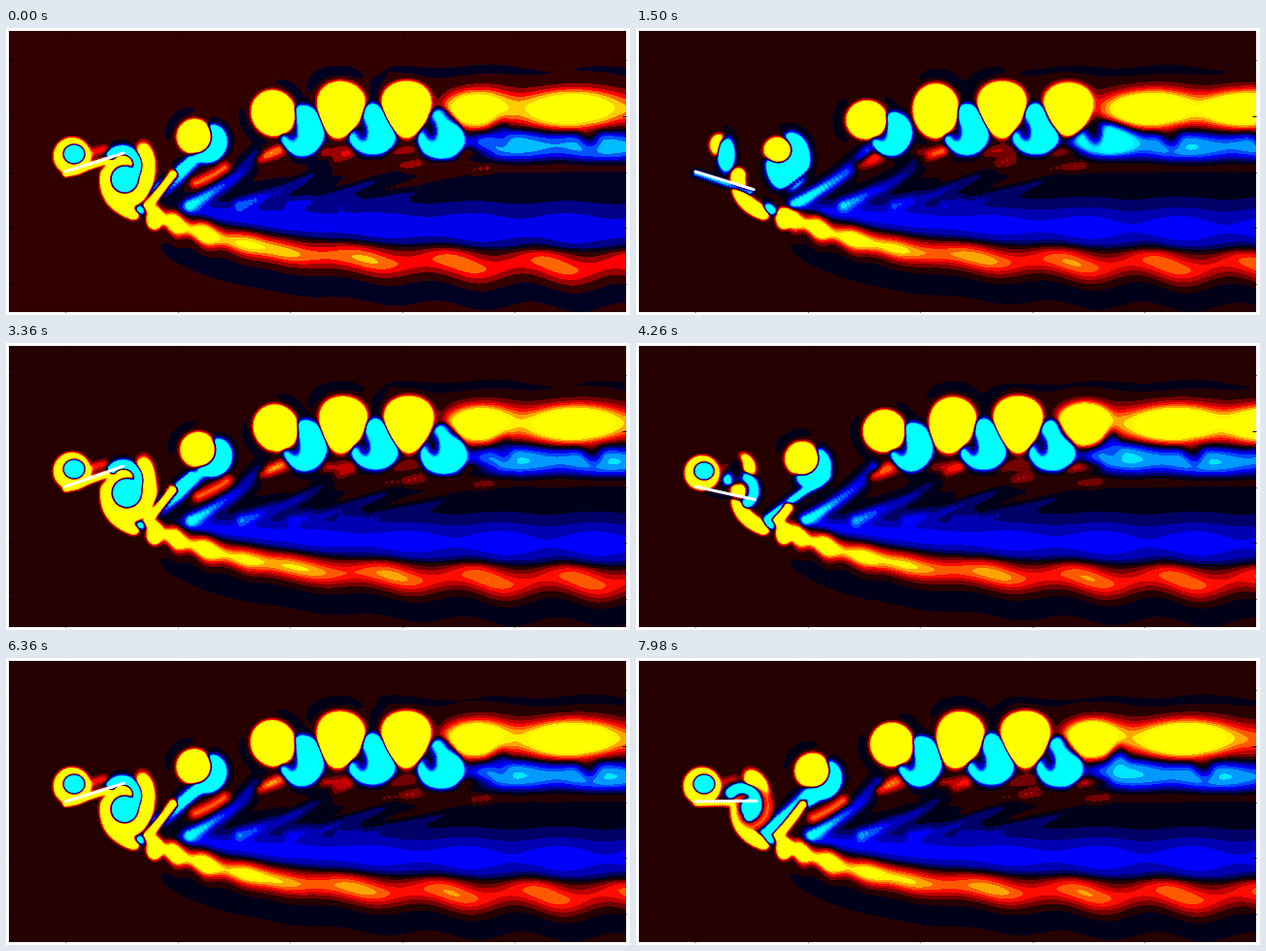
These frames come from a looping animation (642x296 px, 8000 ms). A matplotlib script:

```python
import math
import numpy as np
import matplotlib.pyplot as plt
from matplotlib.animation import FuncAnimation

W, H, DPI = 642, 296, 100
LEFT, TOP, RIGHT, BOTTOM = 3, 3, 638, 293
STEP_MS, TICK_MS, LOOP_MS = 60, 20, 8000
RATE = 0.1792            # flapping periods per step
PX = 72 / DPI

xs = np.arange(LEFT, RIGHT, dtype=np.float32) + 0.5
ys = np.arange(TOP, BOTTOM, dtype=np.float32)[:, None] + 0.5


def smooth(t):
    t = min(max(t, 0), 1)
    return t * t * (3 - 2 * t)


def bump(u, centre, width):
    return math.exp(-((u - centre) / width) ** 2)


def window(x0, x1, y0, y1):
    x0, x1 = max(0, int(x0 - LEFT)), min(RIGHT - LEFT, int(x1 - LEFT))
    y0, y1 = max(0, int(y0 - TOP)), min(BOTTOM - TOP, int(y1 - TOP))
    return (slice(y0, y1), slice(x0, x1)) if x1 > x0 and y1 > y0 else None


def cover(w, win, d, peak, soft):
    """Blend a flat value over the field; d is the distance outside its edge."""
    m = 1 / (1 + np.exp(np.clip(2 * d / soft, -30, 30)))
    w[win] += (peak - w[win]) * m


def patch(w, x, y, a, b, peak, tilt=0, taper=0, soft=3.0, halo=0.0):
    reach = max(a, b) * (1 + max(4 * soft, 18 if halo else 0) / min(a, b))
    win = window(x - reach, x + reach, y - reach, y + reach)
    if win is None:
        return
    c, s = math.cos(math.radians(tilt)), math.sin(math.radians(tilt))
    dx, dy = xs[win[1]] - x, ys[win[0]] - y
    e, f = dx * c + dy * s, dy * c - dx * s
    e = e / (1 - taper * np.clip(f / b, -1.3, 1.3))
    d = (np.hypot(e / a, f / b) - 1) * min(a, b)
    if halo:
        broken = np.clip(0.3 + np.sin(2 * np.arctan2(dy, dx) + x / 30), 0, 1)
        w[win] -= halo * broken * np.exp(-((d - 9) / 4) ** 2)
    cover(w, win, d, peak, soft)


def bend(p0, p1, p2, n=22):
    t = np.linspace(0, 1, n)[:, None]
    p0, p1, p2 = map(np.array, (p0, p1, p2))
    return (1 - t) ** 2 * p0 + 2 * t * (1 - t) * p1 + t ** 2 * p2


def nearest(pts, reach):
    """Window around a curve, distance to it and the position along it."""
    (x0, y0), (x1, y1) = pts.min(0) - reach, pts.max(0) + reach
    win = window(x0, x1, y0, y1)
    if win is None:
        return None, None, None
    X, Y = xs[win[1]], ys[win[0]]
    best = np.full((Y.shape[0], X.shape[0]), 1e6, np.float32)
    pos = np.zeros_like(best)
    for i, (x, y) in enumerate(pts):
        q = (X - x) ** 2 + (Y - y) ** 2
        closer = q < best
        best[closer] = q[closer]
        pos[closer] = i / (len(pts) - 1)
    return win, np.sqrt(best), pos


def stroke(w, pts, radius, peak, soft=2.5):
    win, d, _ = nearest(pts, radius + 4 * soft)
    if win is not None:
        cover(w, win, d - radius, peak, soft)


def wisp(w, pts, sigma, peak, tip=1.0):
    """Faint streak whose strength runs from peak to peak * tip."""
    win, d, pos = nearest(pts, 2.6 * sigma)
    if win is not None:
        w[win] += peak * (1 + (tip - 1) * pos) * np.exp(-(d / sigma) ** 2)


def band(w, centre, sigma, amp, x0, y0, y1):
    win = slice(y0 - TOP, y1 - TOP), slice(x0 - LEFT, None)
    pick = lambda q: q[win[1]] if np.ndim(q) else q
    w[win] += pick(amp) * np.exp(-((ys[win[0]] - pick(centre)) / pick(sigma)) ** 2)


def ramp(lo, hi):
    return np.clip((xs - lo) / (hi - lo), 0, 1)


def decay(start, length):
    return np.exp(-np.maximum(xs - start, 0) / length)


LOW_Y = 246 - 60 * decay(140, 110)
LOW_S = 15 - 7 * decay(140, 200)
LOW_A = (1.15 + 2.6 * decay(145, 95)) * ramp(138, 150)
CORE_TOP = 150 + 26 * decay(165, 110)
CORE_LOW = 231 - 45 * decay(165, 120)
Q = (ys - CORE_TOP) / (CORE_LOW - CORE_TOP)
CORE = (-(0.12 + 0.93 * np.exp(-((Q - 0.72) / 0.33) ** 2)) * ramp(160, 190)
        / (1 + np.exp(np.clip((CORE_TOP - ys) / 2, -30, 30)))
        / (1 + np.exp(np.clip((ys - CORE_LOW) / 2, -30, 30)))).astype(np.float32)


def layers(w, k, phase):
    wave = 2 * np.pi * (xs - 80 - 10.9 * k) / 97
    far = ramp(230, 500)
    near = 1 - ramp(200, 290)
    beads = near * np.cos(2 * np.pi * (9 * np.log(np.maximum(xs - 100, 30) / 52) / 3.2 - phase))
    low_y = LOW_Y + 5 * far * np.sin(wave)
    w += CORE * (1 + 0.1 * far * np.sin(wave + 0.8))
    band(w, low_y, LOW_S * (1 + 0.1 * far * np.cos(wave) + 0.15 * beads),
         LOW_A * (1 + 0.22 * ramp(200, 380) * np.cos(wave) + 0.25 * beads), 135, 165, BOTTOM)
    band(w, low_y + 30, 9, -0.16 * ramp(150, 220), 150, 200, BOTTOM)
    swell = 2 * np.pi * (xs / 105 - phase)
    band(w, 82 + 2 * np.sin(swell), 16, 1.35 * ramp(450, 500), 450, 30, 140)
    band(w, 121 + 2 * np.sin(swell + 1), 12, -1.35 * ramp(460, 510), 460, 75, 165)
    band(w, 142, 5, 0.2 * ramp(330, 380), 320, 120, 165)
    band(w, 45 + 2 * np.sin(swell), 4.5,
         -0.1 * ramp(375, 410) * (0.75 + 0.4 * np.sin(swell / 2)), 375, 25, 70)


BIRTH = (0.2, 0.41, 0.81, 1.0, 1.41, 1.81, 2.0)


def warm_at(u):
    if u < 2:
        return (np.interp(u, BIRTH, (74, 79, 121, 143, 139, 180, 194)),
                np.interp(u, BIRTH, (117, 119, 129, 138, 128, 117, 112)))
    v = u - 2
    x = 194 + 68 * v + 14 * (1 - math.exp(-3 * v)) + 30 * max(u - 5.9, 0)
    return x, 84 + 28 * math.exp(-2 * v)


def cold_at(u):
    if u < 2:
        return (np.interp(u, BIRTH[2:], (117, 122, 149, 191, 209)),
                np.interp(u, BIRTH[2:], (154, 156, 140, 126, 119)))
    v = u - 2
    x = 209 + 71 * v + 26 * (1 - math.exp(-3 * v)) + 25 * max(u - 6.2, 0)
    return x, 104 + 15 * math.exp(-2 * v) + 11 * min(max(u - 4.6, 0), 1.6)


def warm(w, u):
    x, y = warm_at(u)
    far = smooth((u - 5.3) / 0.7)
    if u < 1.3:
        grow = smooth((u - 0.1) / 0.4)
        patch(w, x, y, 3 + 6 * grow, 3 + 7 * grow + 7 * smooth((u - 0.6) / 0.4), 5,
              -35 * bump(u, 0.81, 0.15))
        return
    fresh = math.exp(-1.2 * max(u - 2, 0))
    a = 23.5 - 6.5 * fresh + 20 * min(max(u - 5.6, 0), 1)
    b = 17 + 11 * smooth((u - 2) / 1.9) - 10 * far
    if u < 1.8:
        a, b = 13 + 4 * smooth((u - 1.4) / 0.4), 12 + 5 * smooth((u - 1.4) / 0.4)
    patch(w, x, y, a, b, 5 - 2.2 * far, -35 * bump(u, 2.9, 0.35) + 15 * bump(u, 3.8, 0.25),
          0.27 * smooth(u - 3.2) * (1 - far), 3 + 5 * far,
          0.14 if 1.7 < u < 5.4 else 0)


def cold(w, u):
    x, y = cold_at(u)
    far = smooth((u - 5) / 0.8)
    if u < 1.3:
        ring = smooth((u - 0.75) / 0.25) * (1 - smooth((u - 1.2) / 0.1))
        size = 8 + 9 * smooth((u - 0.75) / 0.4)
        if ring:
            patch(w, x + 3, y + 1, size + 11, size + 15, 5 * ring, 12)
        patch(w, x, y, size, size, -5)
        return
    big = bump(u, 1.41, 0.2)
    a = 17 + 5 * smooth(u - 2) + 5 * big + 16 * far
    b = 19 + 6 * smooth(u - 2) + 11 * big - 13 * far
    patch(w, x, y, a, b, -5 + 3.1 * far, 30 * bump(u, 2.2, 0.6),
          -0.28 * smooth(u - 3) * (1 - far), 3 + 4 * far)
    patch(w, x - 12, 104, 9, 16, -2 * bump(u, 5.85, 0.2), -15, 0, 5)


def trail(w, u):
    """Blue arm left behind a vortex, with a red crease above it."""
    v = u - 2
    x, _ = cold_at(u)
    foot = np.array((137 + 52 * v, 182))
    head = np.array((x - 6 - 40 * smooth(v), 124 + 7 * max(v, 0)))
    knee = 0.45 * foot + 0.55 * head + (6, 7)
    wisp(w, bend(foot, knee, head), 6.5, -3.6 * math.exp(-0.62 * v), 0.6)
    if v > 0.3:
        up = np.array((4, -15))
        wisp(w, bend(foot + (25, -8), knee + up, head + up + (18, 8)), 5,
             0.25, 4 * math.exp(-0.25 * v))
    wx, wy = warm_at(u)
    wx += 17 * math.exp(-2 * max(v, 0))
    rise = 10 * math.exp(-v / 2)
    wisp(w, bend((wx - 16, wy + 42 + rise * 0.6), (wx, wy + 42), (wx + 14, wy + 42 - rise)),
         6.5, 1.3 * math.exp(-0.3 * v) + bump(u, 5.85, 0.3))


def nose(w, u):
    """Vortex on the leading edge, ringed by the opposite sign."""
    grow, leave = smooth((u - 0.45) / 0.35), smooth((u - 1.12) / 0.3)
    x, y = 70 + 20 * leave + 45 * max(u - 1.42, 0), 146 - 16 * grow
    fade = 1 - smooth((u - 1.5) / 0.25)
    a, b = 3 + 8 * grow - 3 * leave, 2 + 8 * grow + 6 * leave
    ring = grow * (1 - leave)
    if ring > 0.05:
        patch(w, x - 2, y + 2, a + 7, b + 8, 5 * ring, soft=2.5)
    patch(w, x, y, a, b, -5 * fade, soft=2.5)


def hook(w, u):
    """Cold sheet rolling over the plate's tip into the main vortex."""
    s = smooth((u - 0.75) / 0.3)
    strength = smooth((u - 0.62) / 0.15) * (1 - smooth((u - 1.1) / 0.12))
    if strength > 0.02:
        cx, cy, r = 106 + 15 * s, 152 - 11 * s, 15.5
        ang = np.radians(np.linspace(-135, 60, 22))
        pts = np.column_stack((cx + r * np.cos(ang), cy + r * np.sin(ang)))
        stroke(w, pts, 4.5, -5 * strength)


def plate_tip(phase):
    dy = 0.5 - 22 * math.cos(2 * math.pi * (phase - 0.075))
    return 60 + math.sqrt(64 ** 2 - dy ** 2), 148 + dy


def roots(w, phase):
    """Sheets leaving the plate and the lower corner of the wake."""
    stroke(w, bend((105, 152), (103, 180), (131, 190)), 6.5, 5)
    u = phase + 1 if phase > 0.6 else phase + 2
    along = smooth((u - 1.6) / 0.25) * (1 - 0.65 * smooth((u - 2.02) / 0.15))
    if u < 2.5:
        tip = np.array((141 + 31 * along, 187 - 36 * along))
        stroke(w, bend((135, 182), (152, 167), (190 + 8 * phase, 137)), 3,
               -4 * (1 - smooth((u - 2.1) / 0.3)))
        stroke(w, bend((142, 187), (152, 176), tip), 4, 5 * (1 - smooth((u - 2.2) / 0.2)))
    patch(w, 138, 187, 6, 4, -4, 40, soft=2.5)
    patch(w, 153, 197, 7, 9, 5, 10, soft=2.5)

    tx, ty = plate_tip(phase)
    swing = math.cos(2 * math.pi * (phase - 0.05))
    stroke(w, bend((62, 150), ((62 + tx) / 2, (153 + ty) / 2), (tx - 4, ty + 3)), 2.5,
           1.5 + 4 * swing, 1.8)
    wisp(w, bend((86, 131), (93, 126), (101, 125)), 5, 0.6 + 0.5 * swing)


def render(k):
    p = RATE * k
    phase = p % 1
    w = np.full((BOTTOM - TOP, RIGHT - LEFT), 0.02, np.float32)
    layers(w, k, phase)
    ages = [n + phase for n in range(8)]
    for u in ages:
        if 1.75 < u < 6.2:
            trail(w, u)
    for u in ages:
        if 1.3 <= u < 7.8:
            cold(w, u)
    for u in ages:
        if 1.3 <= u < 7.8:
            warm(w, u)
    roots(w, phase)
    for u in ages[:2]:
        if 0.15 < u < 1.3:
            warm(w, u)
        if 0.75 < u < 1.3:
            cold(w, u)
        if 0.5 < u < 1.75:
            nose(w, u)
        hook(w, u)
    d = level_step(k, phase)
    return palette(d)[np.clip(np.floor(w / d), -12, 11).astype(int) + 12]


def level_step(k, phase):
    load = math.cos(2 * math.pi * (phase - 0.25)) + 0.4 * math.exp(-k / 15)
    return 8 / 15 if load > 0.7 else 0.4 if load > 0.3 else 0.3


def palette(d):
    lut = np.zeros((24, 3), np.uint8)
    for i in range(24):
        n = i - 12
        c = (n + 0.5) * d if n >= 0 else -(n + 0.67) * d
        main, green = min(c, 1), min(max(c - 1, 0), 1)
        rgb = (main, green, 0) if n >= 0 else (0, green, main)
        lut[i] = [round(255 * q) for q in rgb]
    return lut


fig = plt.figure(figsize=(W / DPI, H / DPI), dpi=DPI, facecolor="white")
ax = fig.add_axes([0, 0, 1, 1])
ax.set_axis_off()
field = ax.imshow(render(0), extent=(LEFT, RIGHT, BOTTOM, TOP),
                  interpolation="nearest", aspect="auto")
ax.set_xlim(0, W)
ax.set_ylim(H, 0)

tick = dict(color="black", lw=PX, solid_capstyle="butt")
for i in range(5):
    tx, ty = round(60 + 115.6 * i) + 0.5, round(32 + 57.8 * i) + 0.5
    for y0, y1 in ((TOP, TOP + 4), (BOTTOM - 4, BOTTOM)):
        ax.plot([tx, tx], [y0, y1], **tick)
    for x0, x1 in ((LEFT, LEFT + 4), (RIGHT - 4, RIGHT)):
        ax.plot([x0, x1], [ty, ty], **tick)
plate, = ax.plot([], [], color="white", lw=3 * PX, solid_capstyle="round")

shown = [None]


def update(i):
    k = i * TICK_MS // STEP_MS
    if k != shown[0]:
        shown[0] = k
        field.set_data(render(k))
        tx, ty = plate_tip(RATE * k % 1)
        plate.set_data([61, tx], [148, ty])
    return field, plate


def reset():
    shown[0] = None
    return update(0)


anim = FuncAnimation(fig, update, frames=LOOP_MS // TICK_MS, init_func=reset,
                     interval=TICK_MS, repeat=True, repeat_delay=0, blit=False)
plt.show()
```
